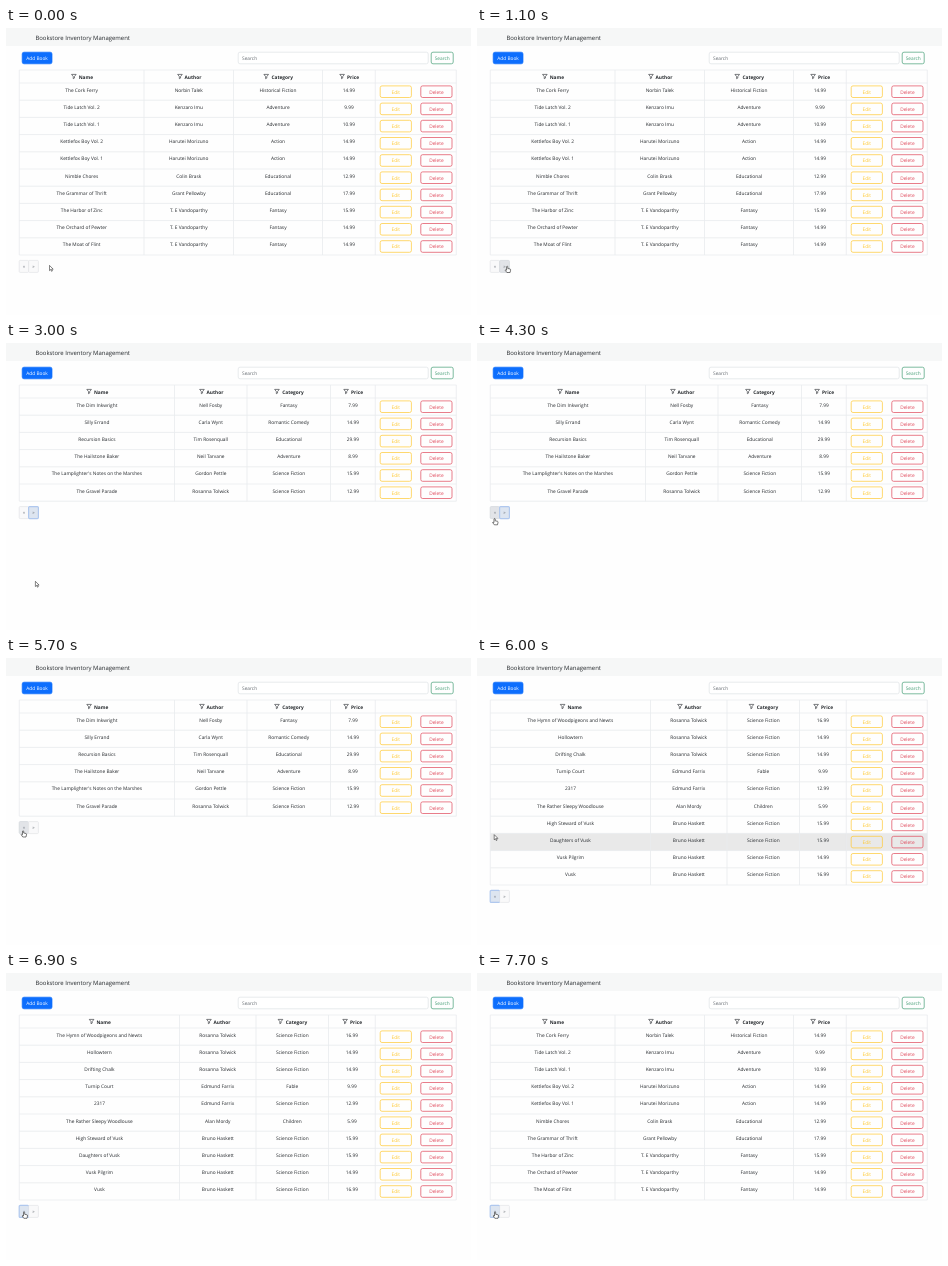
Write an HTML page that moves like this. It is 465 px wide and 287 px high and loops after 8000 ms.

```html
<!DOCTYPE html>
<html lang="en">
<head>
<meta charset="utf-8">
<title>Bookstore Inventory Management</title>
<style>
html, body { margin: 0; width: 100%; height: 100%; overflow: hidden; background: #fefefe; }
svg { display: block; width: 100vw; height: 100vh; }
text { font: 4.8px "Open Sans", "Noto Sans", sans-serif; fill: #24282c; text-rendering: geometricPrecision; }
.mid { text-anchor: middle; }
.bold { font-weight: 700; }
.brand { font-size: 5.95px; }
.line { stroke: #e9ebee; stroke-width: .8; fill: none; }
</style>
</head>
<body>
<svg id="stage" viewBox="0 0 465 287"></svg>
<script>
const LOOP = 8000, STEP = 100;
const LEFT = 13.3, RIGHT = 450.3, HEAD = 42, TOP = 55, ROW = 17.2;

const SCI = "Science Fiction", FAN = "Fantasy", ADV = "Adventure", EDU = "Educational";
const pages = [
  { cols: [138, 227.5, 316.5], rows: [
    ["The Cork Ferry", "Norbin Talek", "Historical Fiction", "14.99"],
    ["Tide Latch Vol. 2", "Kenzaro Imu", ADV, "9.99"],
    ["Tide Latch Vol. 1", "Kenzaro Imu", ADV, "10.99"],
    ["Kettlefox Boy Vol. 2", "Harutei Morizuno", "Action", "14.99"],
    ["Kettlefox Boy Vol. 1", "Harutei Morizuno", "Action", "14.99"],
    ["Nimble Chores", "Colin Brask", EDU, "12.99"],
    ["The Grammar of Thrift", "Grant Pellowby", EDU, "17.99"],
    ["The Harbor of Zinc", "T. E Vandoparthy", FAN, "15.99"],
    ["The Orchard of Pewter", "T. E Vandoparthy", FAN, "14.99"],
    ["The Moat of Flint", "T. E Vandoparthy", FAN, "14.99"]] },
  { cols: [173.5, 250, 322.5], rows: [
    ["The Hymn of Woodpigeons and Newts", "Rosanna Tolwick", SCI, "16.99"],
    ["Hollowtern", "Rosanna Tolwick", SCI, "14.99"],
    ["Drifting Chalk", "Rosanna Tolwick", SCI, "14.99"],
    ["Turnip Court", "Edmund Farrix", "Fable", "9.99"],
    ["2317", "Edmund Farrix", SCI, "12.99"],
    ["The Rather Sleepy Woodlouse", "Alan Mordy", "Children", "5.99"],
    ["High Steward of Vusk", "Bruno Haskett", SCI, "15.99"],
    ["Daughters of Vusk", "Bruno Haskett", SCI, "15.99"],
    ["Vusk Pilgrim", "Bruno Haskett", SCI, "14.99"],
    ["Vusk", "Bruno Haskett", SCI, "16.99"]] },
  { cols: [168.5, 241, 324.5], rows: [
    ["The Dim Inkwright", "Nell Fosby", FAN, "7.99"],
    ["Silly Errand", "Carla Wynt", "Romantic Comedy", "14.99"],
    ["Recursion Basics", "Tim Rosenquall", EDU, "29.99"],
    ["The Hailstone Baker", "Neil Tarvane", ADV, "8.99"],
    ["The Lamplighter's Notes on the Marshes", "Gordon Pettle", SCI, "15.99"],
    ["The Gravel Parade", "Rosanna Tolwick", SCI, "12.99"]] }
];
const heads = [["Name", 14], ["Author", 16], ["Category", 22], ["Price", 12]];

// Timelines: [ms, value...]
const pageAt = [[0, 0], [1500, 1], [3000, 2], [5800, 1], [7700, 0]];
const focusAt = [[0, -1], [1400, 1], [5600, -1], [5800, 0]];
const path = [
  [0, 43.5, 237.4], [400, 43.5, 237.4], [500, 39, 238], [600, 33, 238.3], [700, 30.2, 238.2],
  [2900, 30.2, 238.2], [3000, 29.4, 238.3], [3300, 29.4, 238.3], [3400, 29.2, 237.8], [3500, 29.2, 237.8],
  [3700, 28, 228], [4000, 22, 197], [4300, 17.6, 175.5], [4500, 17.1, 172.7], [5800, 17.1, 172.7],
  [5900, 17.2, 174], [6000, 17.2, 176.6], [6200, 17.8, 209], [6400, 18.2, 242.5],
  [6600, 18.2, 241.5], [6900, 18.1, 239], [LOOP, 18.1, 239]
];

const stage = document.getElementById("stage");

function add(parent, tag, attrs, text) {
  const el = document.createElementNS("http://www.w3.org/2000/svg", tag);
  for (const k in attrs) el.setAttribute(k, attrs[k]);
  if (text) el.textContent = text;
  parent.append(el);
  return el;
}
const label = (p, x, y, text, cls = "mid", fill = "") =>
  add(p, "text", { x, y, class: cls, style: fill && "fill:" + fill }, text);
const box = (p, x, y, width, height, fill, stroke, rx = 1.8) =>
  add(p, "rect", { x, y, width, height, rx, fill, stroke, "stroke-width": .7 });
const path2d = (p, d, attrs) => add(p, "path", { d, ...attrs });

function button(p, x, y, w, text, color) {
  box(p, x, y, w, 11.6, "none", color);
  label(p, x + w / 2, y + 7.6, text, "mid", color);
}

function buildPage({ cols, rows }) {
  const g = add(stage, "g", {});
  const edges = [LEFT, ...cols, 369.3, RIGHT];
  const bottom = TOP + ROW * rows.length;
  const mids = heads.map((_, i) => (edges[i] + edges[i + 1]) / 2);
  let d = `M${LEFT} ${HEAD}H${RIGHT}`;
  for (let i = 0; i <= rows.length; i++) d += `M${LEFT} ${TOP + ROW * i}H${RIGHT}`;
  for (const x of edges) d += `M${x} ${HEAD}V${bottom}`;
  path2d(g, d, { class: "line" });

  heads.forEach(([name, w], i) => {
    const x = mids[i] + 4.2;
    label(g, x, 50.7, name, "mid bold");
    path2d(g, "M-2.3-2H2.3L.6 .2V1.7L-.6 2.3V.2Z", {
      transform: `translate(${x - w / 2 - 5} 48.4)`, fill: "none",
      stroke: "#24282c", "stroke-width": .6, "stroke-linejoin": "round"
    });
  });
  rows.forEach((row, r) => {
    const y = TOP + ROW * r;
    row.forEach((text, i) => label(g, mids[i], y + 8.5, text));
    button(g, 374.2, y + 2.9, 31.2, "Edit", "#ffc933");
    button(g, 414.8, y + 2.9, 31.2, "Delete", "#e0475a");
  });
  return g;
}

// Page chrome
add(stage, "rect", { width: 465, height: 287, fill: "#fefefe" });
add(stage, "rect", { width: 465, height: 18, fill: "#f6f7f7" });
label(stage, 29.4, 11.6, "Bookstore Inventory Management", "brand");
box(stage, 16.2, 24.2, 29.8, 11.6, "#0d6efd", "#0d6efd");
label(stage, 31.1, 31.8, "Add Book", "mid", "#fff");
box(stage, 232.2, 24.2, 190, 11.6, "#fff", "#dee2e6");
label(stage, 236, 31.8, "Search", "", "#666c72");
button(stage, 425.2, 24.2, 22, "Search", "#479f77");

const hoverRow = add(stage, "rect", { x: LEFT, width: RIGHT - LEFT, height: ROW, fill: "#e9e9e9" });
const tables = pages.map(buildPage);

// Pager
const pager = add(stage, "g", {});
const links = [[13.2, 9.4, "«"], [22.6, 9.8, "»"]].map(([x, w, sign]) => {
  const rect = box(pager, x, 0, w, 12, "#f9f9fa", "#e2e4e7", 1);
  label(pager, x + w / 2, 7.5, sign, "mid", "#747a82");
  return { x, w, rect };
});

// Pointers
const arrow = path2d(stage, "M0 0V5.2L1.2 4.1L2 5.9L2.9 5.5L2.1 3.8H3.7Z",
  { fill: "#fff", stroke: "#222", "stroke-width": .55, "stroke-linejoin": "round" });
const hand = path2d(stage,
  "M-.6 .4Q0-.4 .6 .4V2.3L2.9 2.8Q3.6 3 3.4 4L2.9 6.3H-.3L-2 4Q-1.9 3.1-.6 4Z",
  { fill: "#fff", stroke: "#222", "stroke-width": .6, "stroke-linejoin": "round" });

const valueAt = (table, t) => table.filter(k => k[0] <= t).pop()[1];

function pointAt(t) {
  const i = path.findIndex(k => k[0] > t);
  const [t0, x0, y0] = path[i - 1], [t1, x1, y1] = path[i];
  const f = (t - t0) / (t1 - t0);
  return [x0 + (x1 - x0) * f, y0 + (y1 - y0) * f];
}

const show = (el, on) => el.style.display = on ? "" : "none";

function draw(now) {
  const t = Math.floor(now % LOOP / STEP) * STEP;
  const page = valueAt(pageAt, t), focus = valueAt(focusAt, t);
  const [x, y] = pointAt(t);
  const count = pages[page].rows.length;
  const pagerY = TOP + ROW * count + 5.4;

  tables.forEach((g, i) => show(g, i === page));
  const row = Math.floor((y - TOP) / ROW);
  show(hoverRow, row >= 0 && row < count);
  hoverRow.setAttribute("y", TOP + ROW * row);

  pager.setAttribute("transform", `translate(0 ${pagerY})`);
  let over = false;
  links.forEach(({ x: lx, w, rect }, i) => {
    const hot = x >= lx && x < lx + w && y >= pagerY && y < pagerY + 12;
    const on = i === focus;
    over = over || hot;
    rect.setAttribute("fill", on ? "#dde5f0" : hot ? "#e2e4e8" : "#f9f9fa");
    rect.setAttribute("stroke", on ? "#b0c8ee" : hot ? "#d2d6dc" : "#e2e4e7");
    rect.setAttribute("stroke-width", on ? 1.2 : .7);
  });

  show(arrow, !over);
  show(hand, over);
  for (const el of [arrow, hand]) el.setAttribute("transform", `translate(${x} ${y})`);
}

const start = performance.now();
function tick() {
  draw(performance.now() - start);
  requestAnimationFrame(tick);
}
tick();
</script>
</body>
</html>
```
